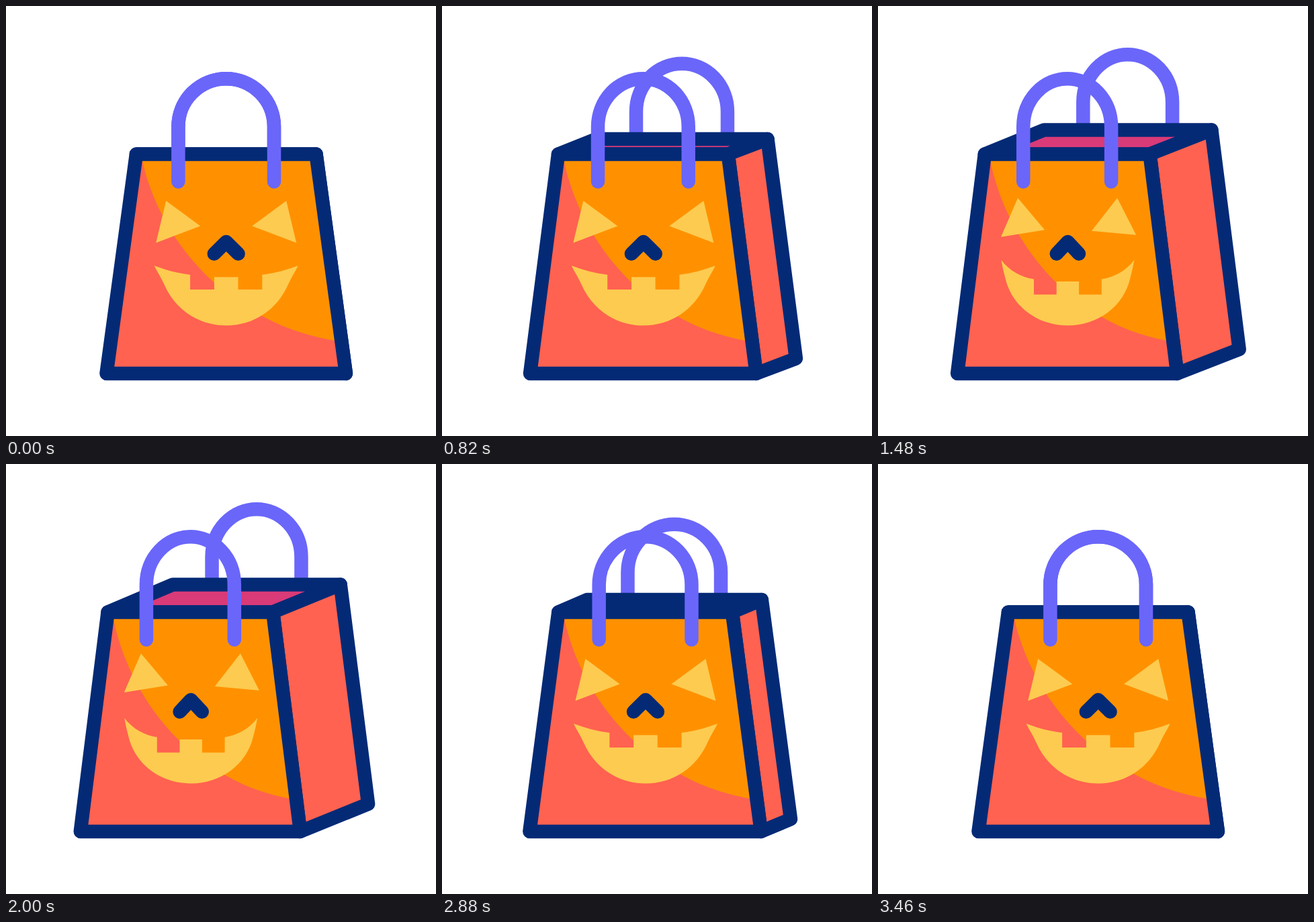
These frames come from a looping animation (640x640 px, 3600 ms). An HTML page:

```html
<!DOCTYPE html>
<html lang="en">
<head>
<meta charset="utf-8">
<title>Pumpkin bag</title>
<style>
  html, body { margin: 0; width: 100%; height: 100%; overflow: hidden; background: #fff; }
  svg { display: block; width: 100%; height: 100%; }
  .line { stroke: #042a76; stroke-width: 20.5; stroke-linejoin: round; stroke-linecap: round; }
  .handle { fill: none; stroke: #6a66fa; stroke-width: 20.5; stroke-linecap: round; }
  .red { fill: #ff6250; }
  .pink { fill: #d93a78; }
  .orange { fill: #ff9100; }
  .glow { fill: #fdcb50; }
  .none { fill: none; }
</style>
</head>
<body>
<svg viewBox="0 0 640 640">
  <clipPath id="clip"><path id="clipShape"/></clipPath>
  <path id="backHandle" class="handle"/>
  <path id="opening" class="line pink"/>
  <path id="side" class="line red"/>
  <path id="front" class="red"/>
  <g clip-path="url(#clip)"><ellipse id="shade" class="orange" cy="149.8" ry="353"/></g>
  <path id="frame" class="line none"/>
  <g id="face">
    <path id="eyes" class="glow"/>
    <path id="mouth" class="glow"/>
    <path id="nose" class="line none"/>
  </g>
  <path id="frontHandle" class="handle"/>
</svg>
<script>
const LOOP = 3600, MID = 327.7, TOP = 220.5, BOTTOM = 547;
const $ = id => document.getElementById(id);
const draw = (id, d) => $(id).setAttribute('d', d);
const clamp = v => Math.min(1, Math.max(0, v));
const mix = (a, b, k) => a + (b - a) * k;

const linear = u => u;
const smooth = u => u * u * (3 - 2 * u);
function bezier(x1, y1, x2, y2) {
  const at = (a, b, t) => 3 * a * t * (1 - t) ** 2 + 3 * b * t * t * (1 - t) + t ** 3;
  return u => {
    let lo = 0, hi = 1;
    for (let i = 0; i < 24; i++) {
      const m = (lo + hi) / 2;
      if (at(x1, x2, m) < u) lo = m; else hi = m;
    }
    return at(y1, y2, (lo + hi) / 2);
  };
}
const settle = bezier(.3, .25, .6, 1);

// time, easing into the key, front centre, front scale, back centre, back scale, lift
const keys = [
  [220, linear, MID, 1, MID, 1, 0],
  [1190, smooth, 285.8, .918, 371, .931, 33.2],
  [2000, linear, 274.4, .918, 373, .932, 41],
  [2390, linear, 266.6, .918, 371.6, .932, 44.7],
  [3460, settle, MID, 1, MID, 1, 0]
];

function pose(t) {
  const i = keys.findIndex(k => t < k[0]);
  if (i < 1) return keys[0].slice(2);
  const a = keys[i - 1], b = keys[i];
  const k = b[1]((t - a[0]) / (b[0] - a[0]));
  return a.slice(2).map((v, j) => mix(v, b[j + 2], k));
}

const poly = pts => 'M' + pts.map(p => p.join(' ')).join('L') + 'Z';
const flip = pts => pts.map(([x, y]) => [-x, y]);
const morph = (a, b, k) => a.map((p, i) => [mix(p[0], b[i][0], k), mix(p[1], b[i][1], k)]);

// corners in order: top left, top right, bottom right, bottom left
function panel(x, s, lift) {
  const p = (w, y) => [x + w * s, y - lift];
  return [p(-133.8, TOP), p(133.8, TOP), p(178.2, BOTTOM), p(-178.2, BOTTOM)];
}

function handle(x, s, lift, end) {
  const r = 71.3 * s, y = 179.5 - lift;
  return `M${x - r} ${end - lift}V${y}A${r} 71.3 0 0 1 ${x + r} ${y}V${end - lift}`;
}

const calmEye = [[-89.5, 290], [-38.5, 327.5], [-104.5, 352.5]];
const gladLeft = [[-74.3, 282], [-34.3, 329.6], [-99.4, 340]];
const gladRight = [[73.7, 282], [35.6, 331], [101.7, 337]];

// left half of the mouth, from the bottom centre up and round to the middle tooth
const calmMouth = [[0, 475.5], [-41, 475.5], [-76, 452], [-92.5, 414], [-97, 404], [-102.5, 396],
  [-107, 386.5], [-90, 393], [-71, 398], [-53.6, 400], [-53.6, 422], [-17.8, 422], [-17.8, 403.5]];
const gladMouth = [[0, 475.5], [-44, 475.5], [-83, 448], [-93, 405], [-95.5, 396], [-97.5, 387],
  [-99, 378], [-87, 394], [-69, 404], [-50.4, 406.5], [-50.4, 429.5], [-16.7, 429.5], [-16.7, 410]];

function mouthHalf(p) {
  const curve = i => 'C' + p.slice(i, i + 3).map(q => q.join(' ')).join(' ');
  return 'M' + p[0].join(' ') + curve(1) + curve(4) + curve(7) +
    p.slice(10).map(q => 'L' + q.join(' ')).join('') + `L0 ${p[12][1]}`;
}

// one closed outline: left half forward, right half backward
function mouthPath(p) {
  const r = flip(p);
  const back = i => 'C' + [r[i + 1], r[i], r[i - 1]].map(q => q.join(' ')).join(' ');
  return mouthHalf(p) + [12, 11, 10, 9].map(i => 'L' + r[i].join(' ')).join('') +
    back(7) + back(4) + back(1) + 'Z';
}

function render(t) {
  const [x, s, bx, bs, lift] = pose(t);
  const f = panel(x, s, 0), b = panel(bx, bs, lift);
  draw('backHandle', handle(bx, bs, lift, 222));
  draw('opening', poly([f[0], f[1], b[1], b[0]]));
  draw('side', poly([f[1], b[1], b[2], f[2]]));
  for (const id of ['front', 'frame', 'clipShape']) draw(id, poly(f));
  $('shade').setAttribute('cx', x + 218.7 * s);
  $('shade').setAttribute('rx', 353 * s);
  draw('frontHandle', handle(x, s, 0, 261.5));

  const glad = smooth(clamp((t - 820) / 380)) * (1 - settle(clamp((t - 2390) / 400)));
  const drop = 3.7 * glad * (1 - smooth(clamp((t - 1480) / 500)));
  const lower = pts => pts.map(([px, py]) => [px, py + drop]);
  $('face').setAttribute('transform', `translate(${MID + (x - MID) * .985} 0)`);
  draw('eyes', poly(lower(morph(calmEye, gladLeft, glad))) +
    poly(lower(morph(flip(calmEye), gladRight, glad))));
  draw('mouth', mouthPath(morph(calmMouth, gladMouth, glad)));
  const n = mix(17.9, 16.6, glad);
  draw('nose', `M${-n} 368.7L0 351L${n} 368.7`);
}

const start = performance.now();
function tick() {
  render((performance.now() - start) % LOOP);
  requestAnimationFrame(tick);
}
tick();
</script>
</body>
</html>
```
